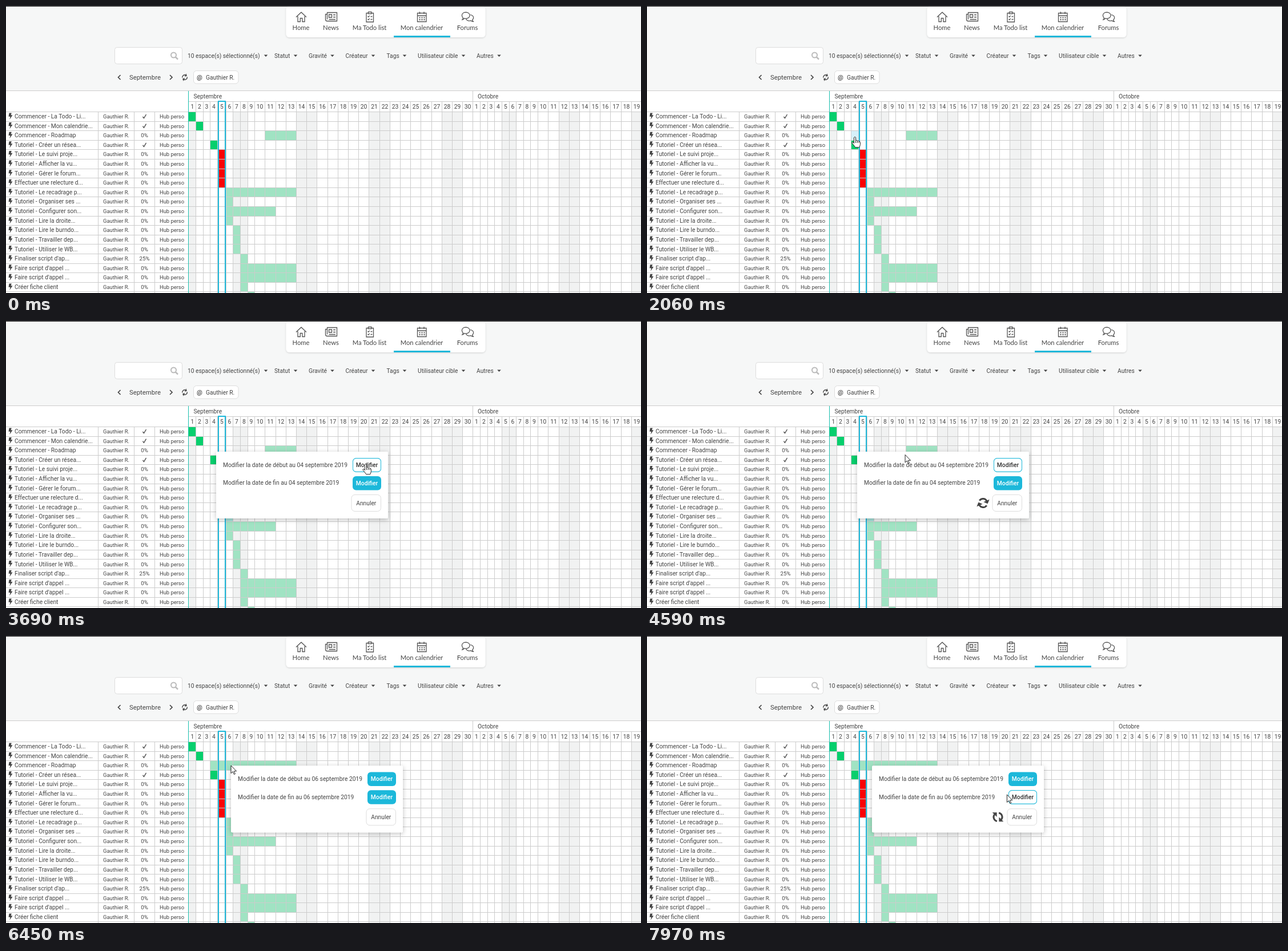
Animation of 1112 by 503 pixels, one loop 8 s. Source, as an HTML page:

```html
<!DOCTYPE html>
<html lang="fr">
<head>
<meta charset="utf-8">
<title>Calendrier</title>
<style>
html, body { margin: 0; width: 100%; height: 100%; overflow: hidden; background: #f6f7f7; }
svg { display: block; font: 10.25px Roboto, sans-serif; }
</style>
</head>
<body>
<svg id="stage" width="1112" height="503" viewBox="0 0 1112 503"></svg>
<script>
const BLUE = '#1cb8da', INK = '#444', LINE = '#ccc';
const WHO = 'Gauthier R.';

// Markup helpers
const rect = (x, y, w, h, fill, more = '') =>
  `<rect x="${x}" y="${y}" width="${w}" height="${h}" fill="${fill}" ${more}/>`;
const text = (x, y, s, more = '') => `<text x="${x}" y="${y}" fill="${INK}" ${more}>${s}</text>`;
const mid = (x, y, s, more = '') => text(x, y, s, 'text-anchor="middle" ' + more);
const stroke = (d, w = 1.3, color = '#555', more = '') =>
  `<path d="${d}" fill="none" stroke="${color}" stroke-width="${w}" ${more}/>`;
const fill = (d, color = INK, more = '') => `<path d="${d}" fill="${color}" ${more}/>`;
const hline = (x, y, w) => rect(x, y, w, 1, LINE);
const vline = (x, y, h) => rect(x, y, 1, h, LINE);
const clamp = v => Math.max(0, Math.min(1, v));

// Grid geometry: 30 days of September, 19 of October, starting on a Sunday
const days = [];
for (let i = 0, x = 320; i < 49; i++) {
  const day = i < 30 ? i + 1 : i - 29;
  const w = i === 4 ? 14.6 : day < 10 ? 12.65 : 18.19;
  days.push({ day, x: Math.floor(x), end: Math.floor(x + w), off: i % 7 === 6 || i % 7 === 0 });
  x += w;
}
const rowY = r => Math.floor(185.4 + 16.61 * r);

// Title, first day, last day, progress
const tasks = [
  ['Commencer - La Todo - Li...', 1, 1, '✓'],
  ['Commencer - Mon calendrie...', 2, 2, '✓'],
  ['Commencer - Roadmap', 11, 13],
  ['Tutoriel - Créer un résea...', 4, 4, '✓'],
  ['Tutoriel - Le suivi proje...', 5, 5],
  ['Tutoriel - Afficher la vu...', 5, 5],
  ['Tutoriel - Gérer le forum...', 5, 5],
  ['Effectuer une relecture d...', 5, 5],
  ['Tutoriel - Le recadrage p...', 6, 13],
  ['Tutoriel - Organiser ses ...', 6, 6],
  ['Tutoriel - Configurer son...', 6, 11],
  ['Tutoriel - Lire la droite...', 6, 6],
  ['Tutoriel - Lire le burndo...', 7, 7],
  ['Tutoriel - Travailler dep...', 7, 7],
  ['Tutoriel - Utiliser le WB...', 7, 7],
  ["Finaliser script d'ap...", 8, 8, '25%'],
  ["Faire script d'appel ...", 8, 13],
  ["Faire script d'appel ...", 8, 13],
  ['Créer fiche client', 8, 8],
  ['', 9, 9]
];

function bar(r, from, to, done) {
  const x = days[from - 1].x, y = rowY(r);
  const color = done === '✓' ? '#06cf6d' : to === 5 ? '#fb0204' : '#a0e3c3';
  return rect(x, y, days[to - 1].end - x, rowY(r + 1) - y, color);
}

const refresh = (x, y, size, turn, w) => `<g transform="translate(${x} ${y}) rotate(${turn}) scale(${size})">
  ${stroke('M-1.5 7A7 7 0 0 1-5.5-4.4M1.5-7A7 7 0 0 1 5.5 4.4', w, INK)}
  ${fill('M-9.4-7.6h7.6v7.4zM9.4 7.6H1.8V.2z')}</g>`;

function toolbar() {
  let s = rect(0, 0, 1112, 1, '#222');
  s += rect(490.5, 0, 349, 55, '#fff', 'rx="6" filter="url(#soft)"') + rect(490, 0, 350, 1, '#222');
  s += rect(679, 52, 99, 3, BLUE);
  s += stroke('M508 19.5L517 11l9 8.5M511 18v9.5h4.3v-6h3.6v6H523V18');
  s += stroke('M562.5 23.5V11.5h17v15h-17q-3 0-3-3v-9h3M565.5 15h5v5h-5zM573 15.5h4M573 19.5h4M565.5 23.5H577');
  s += stroke('M634 12.5h-3v15.5h12.5V12.5h-3M634.5 13.5v-3h5.5v3zM633.5 18l1.2 1.2 2-2.4M638.5 18.5h3M633.5 23l1.2 1.2 2-2.4M638.5 23.5h3');
  s += stroke('M720.5 12.5h15.5v15h-15.5zM720.5 17h15.5M724.5 10v4M732 10v4');
  s += stroke('M723.5 20.5h10M723.5 24h10', 2, '#555', 'stroke-dasharray="2 2"');
  s += stroke('M799 24q1.5-1.5 1.4-3.3-2-1.8-2-4.2c0-3.3 3-5.5 6.8-5.5s6.8 2.2 6.8 5.5-3 5.6-6.8 5.6q-1.6 0-2.8-.4Q801 24 799 24zM813 15.3c3 .4 5.6 2.5 5.6 5.2q0 2.1-1.9 3.8.2 1.6 1.5 3-2.4 0-3.9-1.6c-4 1-7.4-.4-8.6-3.3');
  [['Home', 516.5], ['News', 569], ['Ma Todo list', 636.5], ['Mon calendrier', 728], ['Forums', 808]]
    .forEach(([label, x]) => s += mid(x, 41.5, label, 'font-family="Lato, sans-serif" font-size="11.2"'));

  s += rect(190.5, 72.5, 118, 29, '#fff', 'rx="4" stroke="#ddd"');
  s += '<circle cx="293.5" cy="86" r="4.5" fill="none" stroke="#bbb" stroke-width="2"/>';
  s += stroke('M296.8 89.3l4.2 4.2', 2.5, '#bbb');
  [['10 espace(s) sélectionné(s)', 318, 455], ['Statut', 470, 507], ['Gravité', 530, 571.5], ['Créateur', 594.5, 643],
    ['Tags', 666.5, 698], ['Utilisateur cible', 721, 801], ['Autres', 824, 863.5]].forEach(([label, x, caret]) =>
    s += text(x, 90.5, label) + fill(`M${caret - 3.3} 85.5h6.6l-3.3 3.5z`));

  s += stroke('M200.5 121l-4 4 4 4M287 121l4 4-4 4', 1.7, INK) + refresh(313, 125, .6, 70, 2.4);
  s += text(216, 129, 'Septembre', 'font-size="11.35"');
  s += rect(328.5, 113.5, 78.5, 22.5, '#fff', 'rx="5" stroke="#ddd"');
  return s + text(334, 128.5, '@', 'font-weight="500" font-size="11"') + text(350, 128.5, WHO);
}

function gridBack() {
  let s = rect(0, 148, 1112, 355, '#fff');
  days.forEach(d => { if (d.off) s += rect(d.x, 186, d.end - d.x, 317, '#f1f2f2'); });
  tasks.forEach(([, from, to, done], r) => s += bar(r, from, to, done));
  return s;
}

function gridFront() {
  let s = hline(0, 148, 1112) + hline(320, 167, 792) + vline(days[30].x, 148, 20);
  for (let r = 0; r < 20; r++) s += hline(0, rowY(r), 1112);
  [161, 224, 260].forEach(x => s += vline(x, 185, 318));
  days.forEach((d, i) => {
    if (i) s += vline(d.x, 167, 336);
    s += mid((d.x + d.end) / 2 + .5, 180.2, d.day);
  });
  s += text(328.5, 161.5, 'Septembre') + text(826, 161.5, 'Octobre');
  tasks.forEach(([title, , , done = '0%'], r) => {
    if (!title) return;
    const y = 197 + 16.61 * r;
    s += fill('M5.5-9.5h4.3l-1.3 3.8h3L6.3 2l1.2-5.3h-3z', INK, `transform="translate(0 ${y})"`);
    s += text(15, y, title) + text(170, y, WHO, 'font-size="9.4"') + text(269, y, 'Hub perso', 'font-size="9.4"');
    s += done === '✓' ? stroke(`M239.5 ${y - 3}l2 2.7 4-6.7`, 1.3, INK) : mid(242.5, y, done, 'font-size="9.7"');
  });
  s += rect(319, 149, 1, 354, '#19bfae');
  return s + rect(372, 167, 12, 340, 'none', `stroke="${BLUE}" stroke-width="2"`);
}

// Pointer path: time, x, y, and 1 where the move slows to a stop
const path = [
  [490, 969, 503], [1250, 490, 286], [1310, 448, 269], [2090, 364, 229, 1], [2150, 364, 229], [2270, 366, 228],
  [2560, 366, 228], [3000, 368, 229], [3040, 368, 229], [3120, 367, 300], [3200, 391, 349], [3370, 600, 266],
  [3600, 630, 250, 1], [4350, 630, 250], [4880, 402, 230, 1], [5150, 396, 228], [5660, 396, 228], [6130, 394, 227],
  [6570, 394, 227], [7070, 657, 284, 1], [7140, 657, 284], [7350, 653, 277], [7700, 653, 277], [8000, 628, 278]
];
function pointer(t) {
  const i = Math.max(1, path.findIndex(p => p[0] >= t));
  const [t0, x0, y0] = path[i - 1], [t1, x1, y1, slow] = path[i];
  let k = clamp((t - t0) / (t1 - t0));
  if (slow) k = 1 - (1 - k) ** 2.5;
  return [x0 + (x1 - x0) * k, y0 + (y1 - y0) * k];
}

// Cells light up and fade a little behind the pointer
function hover(t) {
  const glow = {};
  let total = 0;
  for (let age = 40; age <= 180; age += 10) {
    let at = t - age;
    const w = Math.exp((40 - age) / 25);
    total += w;
    if (at < 490) continue;
    if (at > 6300) at = 6300;
    else if (at > 3200 && at < 4910) at = 3200;
    const [x, y] = pointer(at);
    const c = days.findIndex(d => x < d.end), r = Math.floor((y - 185.4) / 16.61);
    const key = c + ',' + r;
    glow[key] = (glow[key] || 0) + w;
  }
  return Object.entries(glow).map(([key, w]) => {
    const [c, r] = key.split(',').map(Number), d = days[c];
    return rect(d.x, rowY(r), d.end - d.x, rowY(r + 1) - rowY(r), '#a9dff2', `opacity="${.48 * w / total}"`);
  }).join('');
}

function button(x, y, lit) {
  return rect(x, y, 50, 24.5, BLUE, 'rx="6"') +
    rect(x + .5, y + .5, 49, 23.5, '#fff', `rx="5.5" stroke="${BLUE}" opacity="${lit}"`) +
    mid(x + 25, y + 15.6, 'Modifier', `font-weight="500" style="fill:${lit > .5 ? '#333' : '#fff'}"`);
}

function dialog(x, y, day, alpha, lit1, lit2, spin) {
  if (alpha <= 0) return '';
  const date = `au ${day} septembre 2019`;
  return `<g transform="translate(${x} ${y})" opacity="${alpha}">` +
    rect(0, 0, 301, 117, '#fff', 'rx="2" filter="url(#drop)"') +
    text(12, 26.5, 'Modifier la date de début ' + date) + text(12, 58.3, 'Modifier la date de fin ' + date) +
    button(239, 11.2, lit1) + button(239, 42.9, lit2) +
    rect(237, 75.5, 51.5, 29, '#fff', 'rx="6" stroke="#ddd"') + mid(262.8, 93.5, 'Annuler') +
    (spin === null ? '' : refresh(220.5, 90, 1.05, spin, 2.8)) + '</g>';
}

function cursor(t) {
  if (t < 490) return '';
  const [x, y] = pointer(t);
  const inDialog = t > 2950 && t < 4910 && !(t > 3050 && t < 3210) || t > 6300;
  const onButton = x > 607 && t < 4800 || x > 633;
  const shape = inDialog && !onButton
    ? 'M0 0V13.6l3.2-2.9 2.2 4.9 2-.9-2.2-4.8h4.300z'
    : 'M-1.5 1.5q1.5-2.4 3 0V6.7q2.3-1 2.8.7 2.2-.7 2.7.9 2.4-.4 2.4 1.9v3.3q-.3 2.3-1.6 5.2H.7Q-1.5 15-5 11.2q-.3-2.3 1.7-1.5l1.8 1.8zM1.5 7v4M4.3 8v3M7 9v2';
  return fill(shape, '#fff', `stroke="#222" stroke-width="1" stroke-linejoin="round" transform="translate(${x} ${y})"`);
}

stage.innerHTML = `<defs>
  <filter id="soft" x="-5%" y="-20%" width="110%" height="150%"><feDropShadow dx="0" dy="1" stdDeviation="1.5" flood-opacity=".16"/></filter>
  <filter id="drop" x="-10%" y="-20%" width="120%" height="150%"><feDropShadow dx="0" dy="2" stdDeviation="4" flood-opacity=".25"/></filter>
  </defs>` + rect(0, 0, 1112, 503, '#f6f7f7') + toolbar() + gridBack() +
  '<g id="under"></g>' + gridFront() + '<g id="over"></g>';
const under = document.getElementById('under'), over = document.getElementById('over');

function draw() {
  const t = performance.now() % 8000;
  const ramp = (start, length) => clamp((t - start) / length);
  const spin = start => t < start ? null : (t - 7970) * .18;
  under.innerHTML = hover(t) + (t >= 5330 ? bar(2, 4, 13) : '');
  over.innerHTML =
    dialog(368, 229, '04', ramp(2950, 115) - ramp(4910, 120), ramp(3410, 240), 0, spin(4110)) +
    dialog(394, 227.3, '06', ramp(6300, 115), 0, ramp(7080, 240), spin(7380)) + cursor(t);
  requestAnimationFrame(draw);
}
draw();
</script>
</body>
</html>
```
